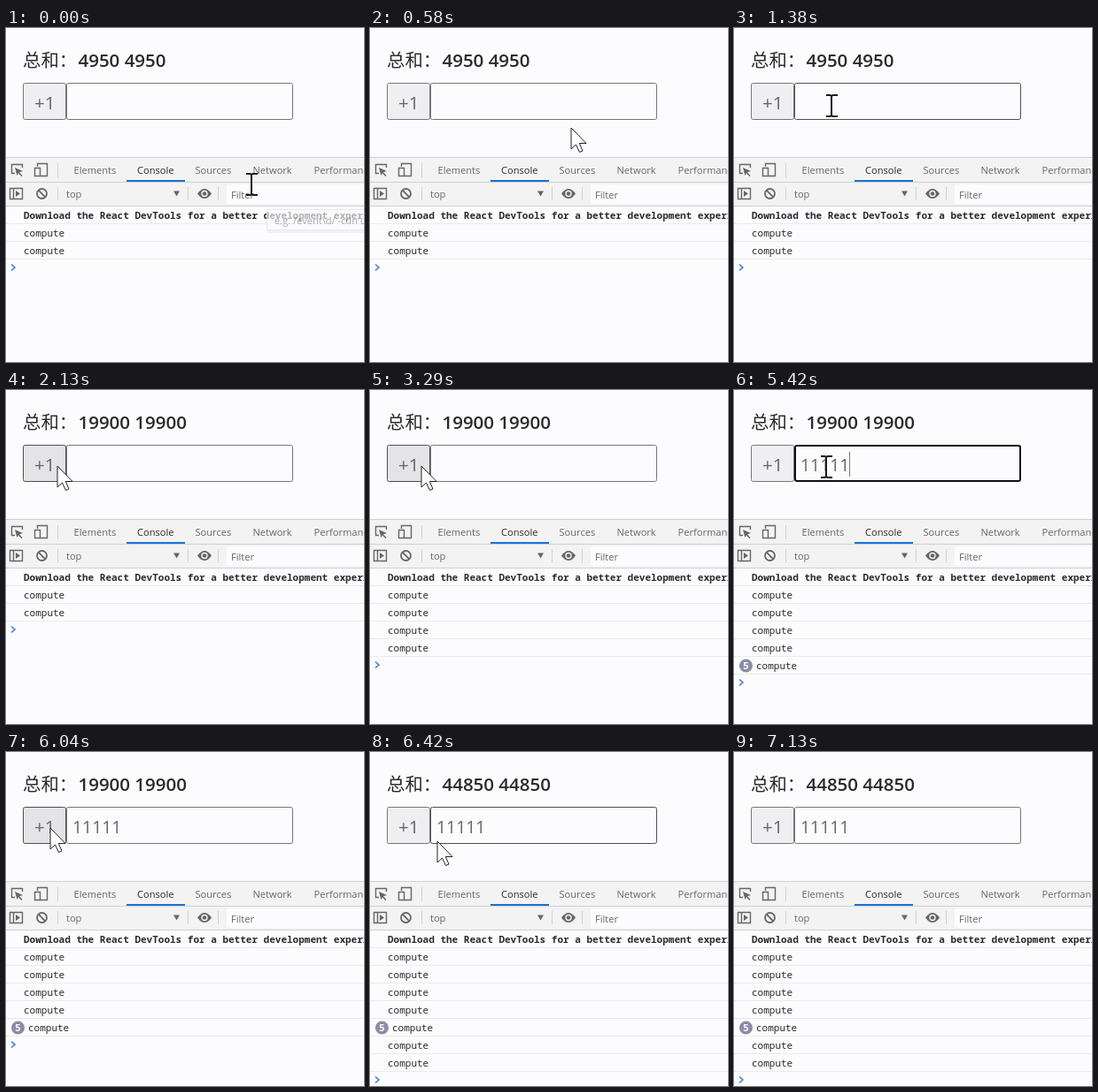
An HTML page that plays this animation: 404 by 378 pixels, repeating every 8370 ms.

```html
<!DOCTYPE html>
<html lang="zh">
<head>
<meta charset="utf-8">
<style>
  html, body { margin: 0; width: 100%; height: 100%; overflow: hidden; background: #fcfcfe; }
  svg { display: block; width: 404px; height: 378px; }
  text { fill: #2a2a2a; white-space: pre; }
  .ui { font: 11.1px "Open Sans", "Noto Sans", sans-serif; }
  .big { font: 20.5px "Open Sans", "Noto Sans", sans-serif; }
  .cjk { font: 20.4px "Noto Sans CJK SC", "Noto Sans CJK", sans-serif; }
  .mono { font: 11px "Noto Sans Mono", "DejaVu Sans Mono", monospace; }
  .soft { fill: #666; }
  .icon { fill: none; stroke: #666; stroke-width: 1.4; }
  .solid { fill: #666; stroke: none; }
  .rule { stroke: #d0d0d2; }
  .line { stroke: #ebebed; }
</style>
</head>
<body>
<svg viewBox="0 0 404 378">
  <text class="cjk" x="19" y="44">总和：</text>
  <text class="big" id="sum" x="81.5" y="44" style="font-weight:600"></text>

  <rect id="button" x="19.5" y="62.5" width="48" height="41" rx="2"/>
  <text class="big soft" x="32" y="92">+1</text>
  <rect id="input" fill="#fcfcfe"/>
  <text class="big soft" id="value" x="75" y="92" style="font-size:19.4px"></text>
  <path id="caret" stroke="#777" d="M0 70V98"/>

  <rect y="147" width="404" height="55" fill="#f3f3f4"/>
  <path class="rule" d="M0 146.5H404M0 174.5H404M0 201.5H404M58.5 153V169M58.5 180V195M205.5 180V195M239.5 180V195"/>
  <rect x="249" y="177" width="155" height="22" fill="#fcfcfe"/>
  <rect x="136" y="172" width="66" height="2" fill="#1a73d8"/>
  <g class="ui">
    <text class="soft" x="76.5" y="165">Elements</text>
    <text x="148" y="165">Console</text>
    <text class="soft" x="213.5" y="165">Sources</text>
    <text class="soft" x="278.5" y="165">Network</text>
    <text class="soft" x="347.5" y="165">Performance</text>
    <text class="soft" x="68" y="192">top</text>
    <text class="soft" x="254" y="193">Filter</text>
  </g>
  <g class="icon">
    <path d="M10 164.5H6.5V154.5H18.5V158"/>
    <path class="solid" d="M10 158L19 162L15 163.200L18.5 167L17.300 168L14 164.200L12.5 167Z"/>
    <path d="M35.5 157V153.5H46.5V167.5H39M32.5 158.5H38.5V167.5H32.5Z"/>
    <path d="M4.5 181.5H18.5V193.5H4.5ZM8.5 181.5V193.5"/>
    <path class="solid" d="M11 184L16 187.5L11 191Z"/>
    <circle cx="40.5" cy="187.5" r="5.5" stroke-width="1.8"/>
    <path d="M36.700 183.700L44.300 191.300" stroke-width="1.8"/>
    <path class="solid" d="M189 184.5H196L192.5 190.5Z"/>
    <path class="solid" d="M216 187.5Q224 176.5 232 187.5Q224 198.5 216 187.5Z"/>
    <circle cx="224" cy="187.5" r="3" stroke="#f3f3f4"/>
  </g>

  <text class="mono" x="20" y="216" style="font-weight:700">Download the React DevTools for a better development experience</text>
  <path class="line" d="M0 221.5H404"/>
  <g id="log"></g>
  <path id="prompt" fill="none" stroke="#3f78d8" stroke-width="1.5" d="M6 -3.5L10 0L6 3.5"/>

  <g id="tip" class="ui">
    <rect x="295" y="207" width="112" height="25" fill="#d0d0d2" opacity=".4"/>
    <rect x="294.5" y="205.5" width="112" height="23" fill="#fafafc" stroke="#e0e0e2"/>
    <text x="303" y="222" style="fill:#808080">e.g. /event\d/ -cdn url:a.com</text>
  </g>

  <g id="cursor">
    <path id="arrow" fill="#fff" stroke="#222" stroke-linejoin="round"
      d="M0 0V24L5.5 19L9.5 27.5L13 26L9.300 17.5H17Z"/>
    <path id="beam" fill="none" stroke="#1a1a1a" stroke-width="2"
      d="M-6 -12H-2Q0 -12 0 -10Q0 -12 2 -12H7M0 -11V11M-6 12H-2Q0 12 0 10Q0 12 2 12H7"/>
  </g>
</svg>
<script>
const LOOP = 8370;
const $ = id => document.getElementById(id);
const set = (id, attrs) => { for (const k in attrs) $(id).setAttribute(k, attrs[k]); };
const show = (id, on) => set(id, { visibility: on ? 'visible' : 'hidden' });
const text = (id, s) => { if ($(id).textContent !== s) $(id).textContent = s; };

// time, x, y of the pointer
const path = [
  [0, 277, 177], [250, 277, 177], [580, 227, 113], [1000, 120, 88], [1290, 120, 88],
  [1880, 58, 86], [3290, 58, 86], [3630, 104, 87], [5560, 104, 87], [5960, 50, 86],
  [6200, 50, 86], [6420, 76, 101], [6830, 200, 270], [6920, 200, 270], [7120, 290, 382], [LOOP, 290, 382]
];
const keys = [4290, 4580, 4880, 5170, 5400];
const focusAt = 3630, blurAt = 6040;

// console rows: appearance time, typed rows are grouped under a counter
const rows = [0, 0, 2170, 2170, keys[0], 6200, 6200];
const typedRow = 4;
$('log').innerHTML = rows.map((_, i) => {
  const y = 236 + 20 * i;
  return `<g id="row${i}"><text class="mono" id="msg${i}" x="20" y="${y}">compute</text>
    <path class="line" d="M0 ${y + 5.5}H404"/></g>`;
}).join('') + `<g id="badge"><circle cx="13.5" cy="312" r="7.5" fill="#8c8ca6"/>
  <text class="ui" id="count" x="13.5" y="316" text-anchor="middle" style="fill:#fff;font-weight:700"></text></g>`;

function pointer(t) {
  const i = path.findIndex(p => p[0] > t);
  const [t0, x0, y0] = path[i - 1], [t1, x1, y1] = path[i];
  const k = (t - t0) / (t1 - t0);
  return [x0 + (x1 - x0) * k, y0 + (y1 - y0) * k];
}

function draw(t) {
  const [x, y] = pointer(t);
  const typed = keys.filter(k => t >= k).length;
  const focused = t >= focusAt && t < blurAt;
  const inRow = y > 62 && y < 104;
  const overInput = inRow && x > 68 && x < 324;
  const overButton = inRow && x > 19 && x <= 68;
  const overFilter = x > 249 && y > 174 && y < 201;

  const total = t < 2040 ? 4950 : t < 6120 ? 19900 : 44850;
  text('sum', `${total} ${total}`);
  set('button', { fill: overButton ? '#e4e4e6' : '#efeff1', stroke: overButton ? '#4f4f4f' : '#767676' });
  set('input', focused
    ? { x: 69, y: 63, width: 254, height: 40, rx: 2, stroke: '#101010', 'stroke-width': 2 }
    : { x: 68.5, y: 62.5, width: 255, height: 41, rx: 2, stroke: overInput ? '#4f4f4f' : '#767676', 'stroke-width': 1 });

  text('value', '1'.repeat(typed));
  const blinkFrom = typed ? keys[typed - 1] : focusAt;
  show('caret', focused && (t - blinkFrom) % 1000 < 500);
  set('caret', { transform: `translate(${Math.round(75 + typed * 11.1) - .5})` });

  rows.forEach((at, i) => show('row' + i, t >= at));
  show('badge', typed > 1);
  text('count', String(typed));
  set('msg' + typedRow, { x: typed > 1 ? 25 : 20 });
  set('prompt', { transform: `translate(0 ${231 + 20 * rows.filter(at => t >= at).length})` });

  set('tip', { opacity: .65 * Math.max(0, Math.min(1, (400 - t) / 150)) });
  const beam = overFilter || (overInput && y < 100);
  show('beam', beam);
  show('arrow', !beam);
  set('cursor', { transform: `translate(${Math.round(x)} ${Math.round(y)})` });
}

const start = performance.now();
function frame() {
  draw((performance.now() - start) % LOOP);
  requestAnimationFrame(frame);
}
frame();
</script>
</body>
</html>
```
